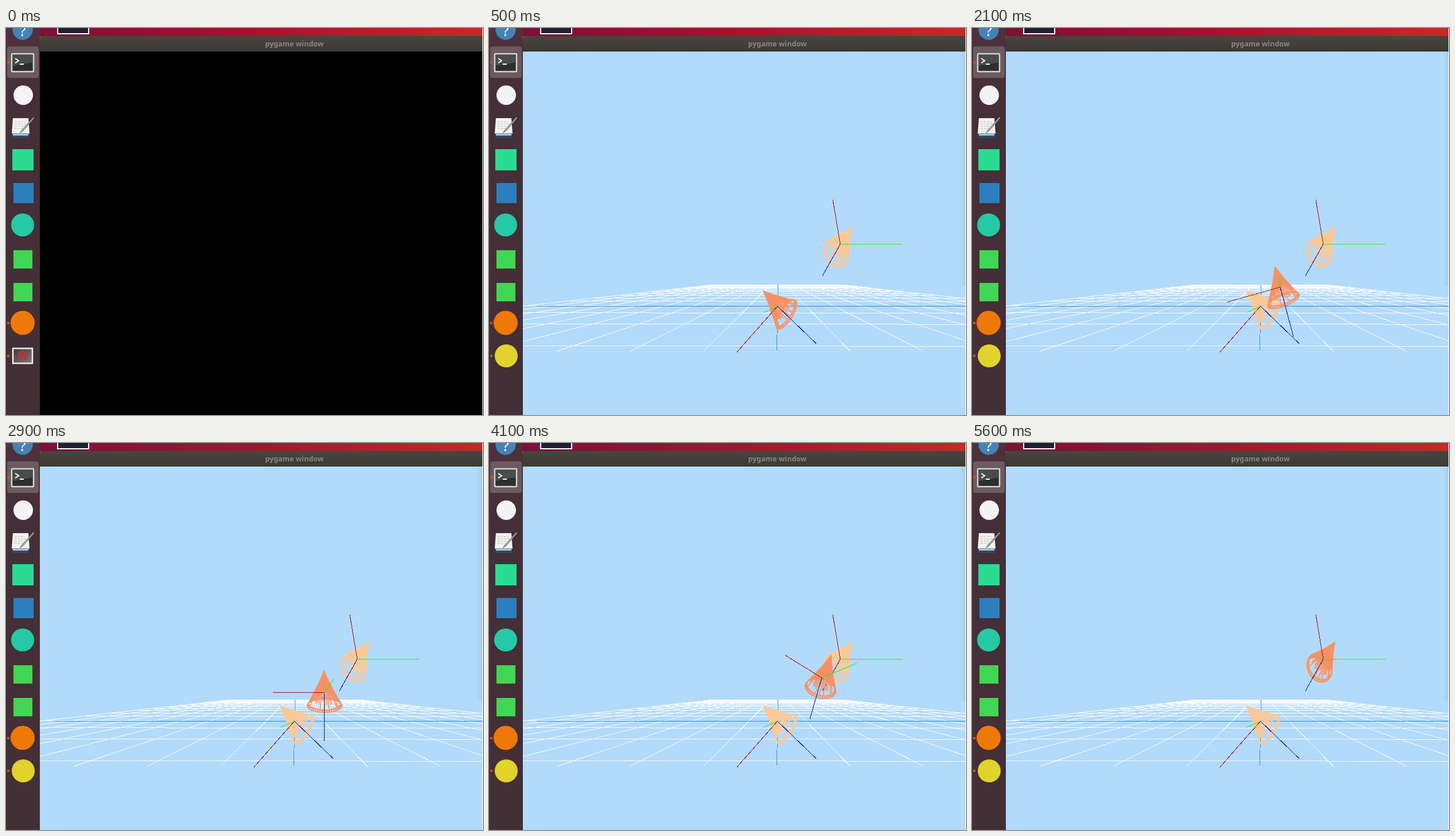
An HTML page that plays this animation: 831 by 674 pixels, repeating every 6100 ms.

```html
<!DOCTYPE html>
<html lang="en">
<head>
<meta charset="utf-8">
<title>Pose interpolation</title>
<style>
  html, body { margin: 0; width: 100%; height: 100%; overflow: hidden; background: #fff; }
  svg { display: block; }
  .lines path { fill: none; stroke-width: 1; shape-rendering: crispEdges; }
  .cone { fill: none; stroke-width: 1.7; stroke-linejoin: round; }
</style>
</head>
<body>
<svg width="831" height="674" viewBox="0 0 831 674">
  <defs>
    <linearGradient id="desk"><stop stop-color="#7c1137"/><stop offset=".55" stop-color="#a81530"/><stop offset="1" stop-color="#c52a25"/></linearGradient>
    <linearGradient id="bar" x2="0" y2="1"><stop stop-color="#47463f"/><stop offset="1" stop-color="#3a3933"/></linearGradient>
    <linearGradient id="dock" x2="0" y2="1"><stop stop-color="#50303c"/><stop offset=".2" stop-color="#452f38"/><stop offset="1" stop-color="#432f36"/></linearGradient>
    <linearGradient id="screen" x2="1" y2="1"><stop stop-color="#3c3c3c"/><stop offset="1" stop-color="#7c7c78"/></linearGradient>
    <linearGradient id="shade"><stop stop-color="#a8cbe8" stop-opacity="0"/><stop offset="1" stop-color="#a8cbe8"/></linearGradient>
    <clipPath id="view"><path d="M59 41H830V674H59z"/></clipPath>
  </defs>

  <rect width="59" height="674" fill="url(#dock)"/>
  <rect x="59" width="771" height="15" fill="url(#desk)"/>
  <path d="M90 -3H144V10H90z" fill="#1d2232" stroke="#fff" stroke-width="2"/>
  <path d="M59 41V18Q59 14 63 14H830V41z" fill="url(#bar)"/>
  <text x="502.500" y="32" text-anchor="middle" font-family="'Noto Sans', 'Open Sans', sans-serif" font-weight="700" font-size="12.500" fill="#89877f">pygame window</text>
  <rect x="59" y="41" width="771" height="633" fill="#000"/>

  <g id="scene" clip-path="url(#view)">
    <rect x="59" y="41" width="771" height="633" fill="#b2dafa"/>
    <rect x="820" y="41" width="10" height="408" fill="url(#shade)"/>
    <g class="lines">
      <path id="grid" stroke="#f8fafc"/>
      <path d="M83 484.500H830M503.500 447L501.500 562" stroke="#2c8fd6"/>
    </g>
    <g id="bodies"></g>
  </g>

  <rect x="2" y="32" width="55" height="55" rx="4" fill="#6b5b60"/>
  <g fill="#e04a20"><circle cx="4" cy="60" r="2.300"/><circle cx="4" cy="514" r="2.300"/><circle cx="4" cy="571" r="2.300"/></g>

  <circle cx="29" cy="3" r="17.500" fill="#4683b5" stroke="#386b98"/>
  <text x="29" y="14" text-anchor="middle" font-family="'Noto Serif', serif" font-size="25" fill="#fff">?</text>

  <rect x="10" y="45" width="38" height="31" rx="1" fill="#2d2e2e" stroke="#d6d6d2" stroke-width="2.500"/>
  <path d="M12 47H46V60L12 66z" fill="#4a4b4b"/>
  <path d="M16 53L22 57L16 61M24 63H31" fill="none" stroke="#fff" stroke-width="2"/>

  <circle cx="30" cy="117" r="17" fill="#f4f4f2"/>

  <path d="M11 182H40V191H11z" fill="#28506f"/>
  <path d="M12 186H39" stroke="#e8e8e8" stroke-width="2"/>
  <path d="M12 157H39L41 184H10z" fill="#f3f3ef"/>
  <path d="M15 163H34M15 167H36M15 171H31M15 175H28" stroke="#b9b9b5" stroke-dasharray="4 1.500"/>
  <path d="M24 183L28 177L48 155L49 157L30 179z" fill="#a4aaa8" stroke="#5e6562" stroke-width=".8"/>

  <rect x="11" y="211" width="37" height="37" fill="#29dc92"/>
  <rect x="13" y="270" width="35" height="35" fill="#2b7fbe"/>
  <circle cx="29" cy="343" r="20" fill="#25c9a5"/>
  <rect x="13" y="387" width="33" height="32" fill="#41d653"/>
  <rect x="13" y="444" width="33" height="32" fill="#41d653"/>
  <circle cx="29" cy="513.500" r="21" fill="#ef7908"/>

  <g id="waiting">
    <rect x="12" y="558" width="34" height="26" fill="url(#screen)" stroke="#f2f2f0" stroke-width="2.500"/>
    <g fill="none" stroke="#cf2b30" stroke-width="2.500"><circle cx="29" cy="571" r="7.500"/><path d="M24 566L34 576"/></g>
  </g>
  <circle id="ready" cx="30" cy="571" r="20" fill="#e1d22c"/>
</svg>

<script>
const LOOP = 6100, STEP = 100, START = 500, TRAVEL = 5100, READY = 300;
const el = id => document.getElementById(id);

// Each pose: progress, then red, green and blue tips, cone apex, base centre, base half-axes.
const poses = [
  [0,    432, 565, 478, 496, 570, 550, 478, 458, 519, 500, 16, -25, 9, 6],
  [.176, 433, 516, 511, 461, 567, 546, 507, 433, 533, 487, 24, -19, 6, 8],
  [.314, 444, 478, 536, 434, 560, 538, 528, 416, 543, 476, 28, -11, 4, 9],
  [.47,  465, 435, 572, 411, 555, 520, 554, 397, 555, 459, 31, 0, 0, 12],
  [.706, 516, 370, 641, 384, 559, 481, 596, 370, 577, 429, 27, 7, -4, 16],
  [.902, 569, 317, 701, 379, 573, 448, 621, 355, 596, 404, 24, 9, -5, 21],
  [1,    599, 300, 720, 377, 581, 432, 632, 347, 605, 392, 22, 10, -5, 24]
];

function slope(i, c) {
  const a = poses[Math.max(i - 1, 0)], b = poses[i], d = poses[Math.min(i + 1, poses.length - 1)];
  const rate = (p, q) => (q[c] - p[c]) / (q[0] - p[0]);
  if (a === b) return rate(b, d);
  if (b === d) return rate(a, b);
  const w = (b[0] - a[0]) / (d[0] - a[0]);
  return rate(a, b) * (1 - w) + rate(b, d) * w;
}

// Cubic Hermite interpolation of every pose value.
function poseAt(s) {
  let i = 0;
  while (i < poses.length - 2 && s > poses[i + 1][0]) i++;
  const p = poses[i], q = poses[i + 1], h = q[0] - p[0], t = (s - p[0]) / h;
  const t2 = t * t, t3 = t2 * t;
  const values = p.map((v, c) => c &&
    v * (2 * t3 - 3 * t2 + 1) + q[c] * (3 * t2 - 2 * t3) +
    h * (slope(i, c) * (t3 - 2 * t2 + t) + slope(i + 1, c) * (t3 - t2)));
  return { origin: [502.5 + 109.5 * s, 484.5 - 108 * s + 3 * s * (1 - s)], values };
}

const point = (x, y) => x.toFixed(1) + ' ' + y.toFixed(1);
const noise = k => { const v = Math.sin(k * 12.9898 + 4) * 43758.5453; return v - Math.floor(v); };

// A slightly flared cone of wires, with irregular gaps just above a dense rim.
function conePath([, , , , , , , ax, ay, cx, cy, ux, uy, vx, vy]) {
  const count = 44;
  const at = (k, f) => {
    const a = k / count * 2 * Math.PI, r = f ** 1.15, c = r * Math.cos(a), n = r * Math.sin(a);
    return point(ax + (cx - ax) * f + ux * c + vx * n, ay + (cy - ay) * f + uy * c + vy * n);
  };
  const wire = (k, from, to) => 'M' + at(k, from) + 'L' + at(k, (from + to) / 2) + 'L' + at(k, to);
  let d = '';
  for (let k = 0; k < count; k++) {
    const gap = .68 + .14 * noise(k);
    d += wire(k, 0, gap) + wire(k, noise(k + 50) < .4 ? gap : .9, .98);
  }
  for (const f of [.93, .98]) {
    d += 'M' + Array.from({ length: count }, (_, k) => at(k, f)).join('L') + 'z';
  }
  return d;
}

function addPath(parent, attrs) {
  const path = document.createElementNS('http://www.w3.org/2000/svg', 'path');
  for (const name in attrs) path.setAttribute(name, attrs[name]);
  return parent.appendChild(path);
}

function addBody(colour) {
  const cone = addPath(el('bodies'), { class: 'cone', stroke: colour });
  const group = document.createElementNS('http://www.w3.org/2000/svg', 'g');
  group.setAttribute('class', 'lines');
  el('bodies').appendChild(group);
  const axes = ['#a60a20', '#1cf51c', '#0a0a9c'].map(stroke => addPath(group, { stroke }));
  return s => {
    const { origin, values } = poseAt(s);
    cone.setAttribute('d', conePath(values));
    axes.forEach((axis, i) => axis.setAttribute('d',
      'M' + point(...origin) + 'L' + point(values[1 + 2 * i], values[2 + 2 * i] - .5)));
  };
}

function gridPath() {
  const horizon = 434.5, far = 447.5, near = 563, spacing = 127.7, cells = 9;
  const closeness = y => (y - horizon) / (near - horizon);
  const across = (i, y) => 503.2 - 1.5 * closeness(y) + i * spacing * closeness(y);
  let d = '';
  for (let i = -cells; i <= cells; i++)
    d += 'M' + point(across(i, far), far) + 'L' + point(across(i, near), near);
  for (let k = 0; k < 18; k++) {
    const y = horizon + 1 / (.00838 + .00392 * k), tilt = 1.7 * closeness(y) ** 2;
    d += 'M' + point(across(-cells, y), y - tilt) + 'L' + point(across(cells, y), y + tilt);
  }
  return d;
}

el('grid').setAttribute('d', gridPath());
addBody('#fbc998')(0);
addBody('#fbc998')(1);
const moveBody = addBody('#f79164');
const show = (id, on) => { el(id).style.display = on ? '' : 'none'; };

function render(ms) {
  const t = Math.floor(ms % LOOP / STEP) * STEP;
  show('scene', t >= START);
  show('waiting', t < READY);
  show('ready', t >= READY);
  moveBody(Math.min(1, Math.max(0, (t - START) / TRAVEL)));
}

const began = performance.now();
function tick() {
  render(performance.now() - began);
  requestAnimationFrame(tick);
}
tick();
</script>
</body>
</html>
```
